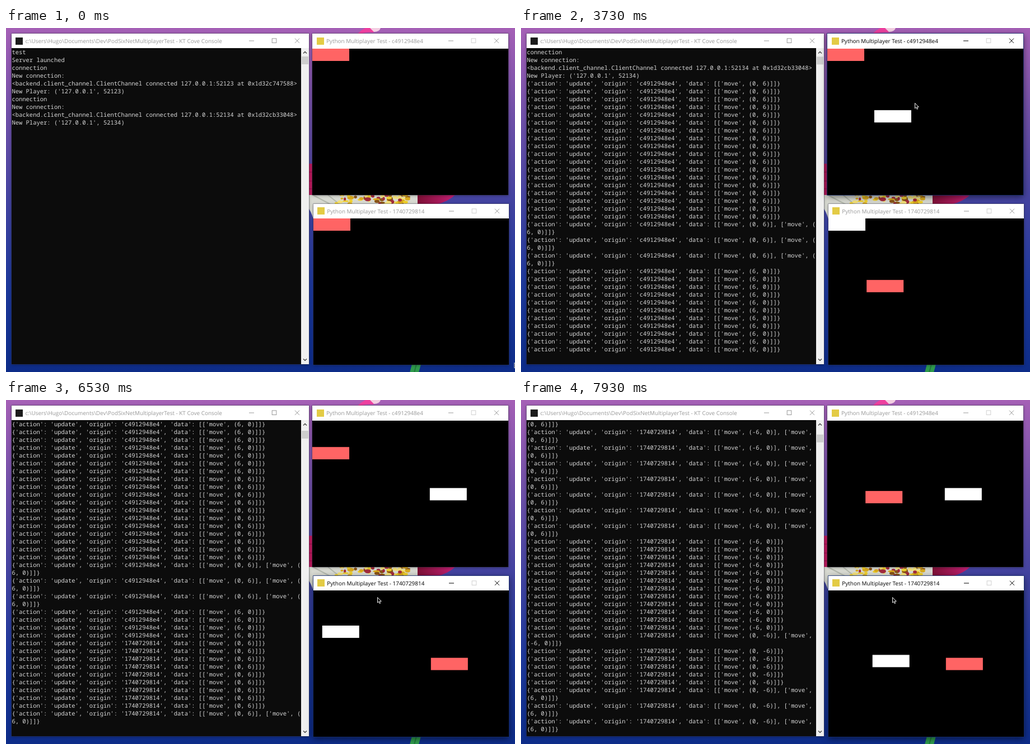
An HTML page for the animation above (8 s loop, 909 px wide and 616 px high).

```html
<!DOCTYPE html>
<html lang="en">
<head>
<meta charset="utf-8">
<title>Multiplayer test</title>
<style>
  html, body { margin: 0; width: 100%; height: 100%; overflow: hidden; background: #4a4aa2; }
  #stage { position: relative; width: 909px; height: 616px; overflow: hidden; }
  #stage * { position: absolute; }
  #wall, #wall * { position: static; }
  #wall { position: absolute; left: 0; top: 0; }

  .win {
    background: #fff; color: #999; z-index: 1;
    box-shadow: 0 0 0 .6px rgba(60, 60, 80, .6), 0 1px 5px rgba(0, 0, 0, .35);
  }
  .win.on {
    color: #000; z-index: 2;
    box-shadow: 0 0 0 .8px #17306f, 0 3px 11px rgba(0, 0, 0, .55);
  }
  .icon { top: 6.5px; width: 13px; height: 13px; }
  .title {
    top: 0; height: 26px; white-space: pre; text-rendering: geometricPrecision;
    font: 9.95px/26px "Open Sans", "Noto Sans", sans-serif;
  }
  .btns { top: 0; overflow: visible; fill: none; stroke: currentColor; }

  #console { left: 10.4px; top: 10.3px; width: 530.6px; height: 592px; }
  #screen { left: 0; top: 26px; width: 516.6px; height: 566px; background: #0c0c0c; overflow: hidden; }
  #log {
    left: 0; top: .3px; margin: 0; white-space: pre; color: #d8d8d8;
    font: 10.49px/14px "Noto Sans Mono", "DejaVu Sans Mono", monospace;
    text-rendering: geometricPrecision; font-variant-ligatures: none;
  }
  #caret { left: .3px; top: 150px; width: 6px; height: 2px; background: #ccc; }
  #bar { left: 516.6px; top: 26px; width: 14px; height: 566px; background: #f0f0f0; }
  #thumb { left: .8px; top: 15px; width: 12.4px; height: 14px; background: #cdcdcd; }
  #bar svg { left: 0; top: 0; fill: none; stroke: #484848; stroke-width: 1.5; }

  .game { width: 349.4px; height: 288.4px; }
  #one { left: 547.4px; top: 10.4px; }
  #two { left: 548.8px; top: 314.6px; }
  .field { left: 0; top: 26.6px; width: 349.4px; height: 261.8px; background: #000; overflow: hidden; }
  .box { left: 0; top: 0; width: 65.8px; height: 22px; }
  .own { background: #fff; }
  .other { background: #ff6464; }
  #cursor { left: 0; top: 0; z-index: 5; overflow: visible; }
</style>
</head>
<body>
<div id="stage">
  <svg id="wall" width="909" height="616">
    <defs>
      <linearGradient id="sky" x2="0" y2="1">
        <stop offset="0" stop-color="#a560b6"/>
        <stop offset=".25" stop-color="#7050a8"/>
        <stop offset=".5" stop-color="#4343a0"/>
        <stop offset=".75" stop-color="#1d389a"/>
        <stop offset="1" stop-color="#0d2c88"/>
      </linearGradient>
      <linearGradient id="petal">
        <stop offset="0" stop-color="#7d0f35"/>
        <stop offset="1" stop-color="#c41f74"/>
      </linearGradient>
    </defs>
    <rect width="909" height="616" fill="url(#sky)"/>
    <path d="M627 11Q636 2 646 -2H662L656 8Q642 7 634 11Z" fill="#ee3f9f"/>
    <path d="M650 0H669Q667 7 657 7Z" fill="#f3cfe2"/>
    <path d="M538 243H550V300H538Z" fill="#c01a60"/>
    <path d="M538 258H550M538 274H550M538 288H550" stroke="#8d1045"/>
    <path d="M538 299H736V318H570L549 342Q544 326 538 320Z" fill="#d8dad2"/>
    <path d="M548 299L580 316M575 299L596 316" stroke="#b4b9ae" stroke-width="2"/>
    <path d="M735 298H803Q790 311 768 316H735Z" fill="url(#petal)"/>
    <g id="stamens"></g>
    <path d="M725 602H741L737 617H721Z" fill="#2f9a4c"/>
    <path d="M733 602L729 617" stroke="#1f7a3b" stroke-width="2"/>
  </svg>

  <div class="win" id="console">
    <div class="icon" style="left:6.5px;background:#1c1c1c"></div>
    <div class="title" style="left:24px">c:\Users\Hugo\Documents\Dev\PodSixNetMultiplayerTest - KT Cove Console</div>
    <div id="screen"><pre id="log"></pre><div id="caret"></div></div>
    <div id="bar">
      <div id="thumb"></div>
      <svg width="14" height="566"><path d="M4 9.5L7 6.5L10 9.5M4 556.5L7 559.5L10 556.5"/></svg>
    </div>
  </div>
  <div class="win game" id="one">
    <div class="icon" style="left:7.5px;background:#e3cb45"></div>
    <div class="title" style="left:24.5px">Python Multiplayer Test - c4912948e4</div>
    <div class="field"><div class="box own"></div><div class="box other"></div></div>
  </div>
  <div class="win game" id="two">
    <div class="icon" style="left:7.5px;background:#e3cb45"></div>
    <div class="title" style="left:24.5px">Python Multiplayer Test - 1740729814</div>
    <div class="field"><div class="box own"></div><div class="box other"></div></div>
  </div>

  <svg id="cursor" width="9" height="13">
    <path d="M.5 .5V10L2.7 8L4.2 11.5L5.7 10.8L4.3 7.4H7.3Z" fill="#111" stroke="#fff" stroke-width=".9"/>
  </svg>
</div>

<script>
const LOOP = 8000, TICK = 200 / 3, UNIT = 0.8743, COLS = 82, ROWS = 40;
const $ = s => document.querySelector(s);
const wins = [$('#console'), $('#one'), $('#two')];

// Window buttons
wins.forEach((win, i) => {
  const x = i ? 242.5 : 423.5;
  win.insertAdjacentHTML('beforeend', `<svg class="btns" style="left:${x}px" width="100" height="26">
    <path d="M0 13H9M82 8.7L90 16.9M90 8.7L82 16.9"/>
    <rect x="41.2" y="8.9" width="7.6" height="7.6" ${i ? 'stroke="#d0d0d0"' : ''}/></svg>`);
});

// Flower centre
let seed = 7;
const rnd = () => (seed = seed * 16807 % 2147483647) / 2147483647;
const tints = ['#f0d02c', '#d9a91c', '#8a5418', '#f5e27a', '#a32a3c'];
let dots = '';
for (let i = 0; i < 70; i++) {
  const x = 590 + rnd() * 128, y = 299 + rnd() * 16;
  dots += `<ellipse cx="${x}" cy="${y}" rx="${2 + rnd() * 4}" ry="${1.5 + rnd() * 2}" fill="${tints[i % 5]}"/>`;
}
$('#stamens').innerHTML = dots;

// Moves in game units; each run is [count, move, move...]
const D = [0, 6], U = [0, -6], R = [6, 0], L = [-6, 0];
const steps = [];
function play(id, start, period, runs) {
  let at = start;
  for (const [count, ...moves] of runs)
    for (let i = 0; i < count; i++, at += period) steps.push({ id, at, moves });
}
play(0, 3190, 16, [[18, D], [3, D, R], [21, R]]);
play(0, 4152, 16, [[10, U], [2, U, R], [4, R]]);
play(0, 4411, 19.5, [[3, R], [11, D], [3, D, R], [4, R]]);
play(1, 6344, 16, [[9, D], [7, D, R], [3, R], [6, U], [5, L], [4, D], [24, R], [6, D, R],
  [1, D], [12, L, D], [12, L], [1, U, L], [5, U], [5, U, R]]);

const names = ['c4912948e4', '1740729814'];
const wrap = s => s.match(new RegExp(`.{1,${COLS}}`, 'g'));
for (const s of steps) {
  const data = s.moves.map(([x, y]) => `['move', (${x}, ${y})]`).join(', ');
  s.rows = wrap(`{'action': 'update', 'origin': '${names[s.id]}', 'data': [${data}]}`);
}
const join = (port, addr) => ['connection', 'New connection:',
  `<backend.client_channel.ClientChannel connected 127.0.0.1:${port} at ${addr}>`,
  `New Player: ('127.0.0.1', ${port})`];
const intro = ['test', 'Server launched', ...join(52123, '0x1d32c747588'), ...join(52134, '0x1d32cb33048')];

function place(el, id, t) {
  let x = 0, y = 0;
  for (const s of steps)
    if (s.id === id && s.at <= t) for (const m of s.moves) { x += m[0]; y += m[1]; }
  el.style.transform = `translate(${x * UNIT}px, ${y * UNIT}px)`;
}

// Pointer trips: start, end, from, to
const trips = [
  [535, 866, [907.5, 599], [582, 407]],
  [1005, 1200, [582, 407], [376, 274]],
  [1805, 2000, [376, 274], [703, 134]],
  [5268, 5600, [703, 134], [663, 353]]
];
function pointer(t) {
  let pos = trips[0][2];
  for (const [a, b, p, q] of trips) {
    if (t < a) break;
    const k = Math.min(1, (t - a) / (b - a)), e = k * k * (3 - 2 * k);
    pos = p.map((v, i) => v + (q[i] - v) * e);
  }
  return pos;
}

// The picture steps 15 times a second; the slack covers times rounded to 10 ms
const SLACK = 4;
const boxes = [...document.querySelectorAll('.box')];
let last = -1;
function draw() {
  const tick = Math.floor((performance.now() + SLACK) % LOOP / TICK);
  if (tick !== last) {
    last = tick;
    render(tick * TICK + 0.01);
  }
  requestAnimationFrame(draw);
}
function render(t) {
  const focus = t < 1400 ? -1 : t < 2200 ? 0 : t < 5800 ? 1 : 2;
  wins.forEach((w, i) => w.classList.toggle('on', i === focus));
  $('#caret').style.display = focus === 0 && t < 1930 ? '' : 'none';

  const lag = t < 7000 ? 48 : 32;
  place(boxes[0], 0, t);
  place(boxes[1], 1, t - lag);
  place(boxes[2], 1, t);
  place(boxes[3], 0, t - lag);

  const rows = intro.concat(...steps.filter(s => s.at <= t - 32).map(s => s.rows));
  const shown = t < 7930 ? ROWS - 1 : ROWS;
  $('#log').textContent = rows.slice(-shown).join('\n');
  $('#thumb').style.transform = `translateY(${Math.max(0, rows.length - shown) / 17}px)`;

  const [x, y] = pointer(t);
  $('#cursor').style.transform = `translate(${x}px, ${y}px)`;
}
draw();
</script>
</body>
</html>
```
